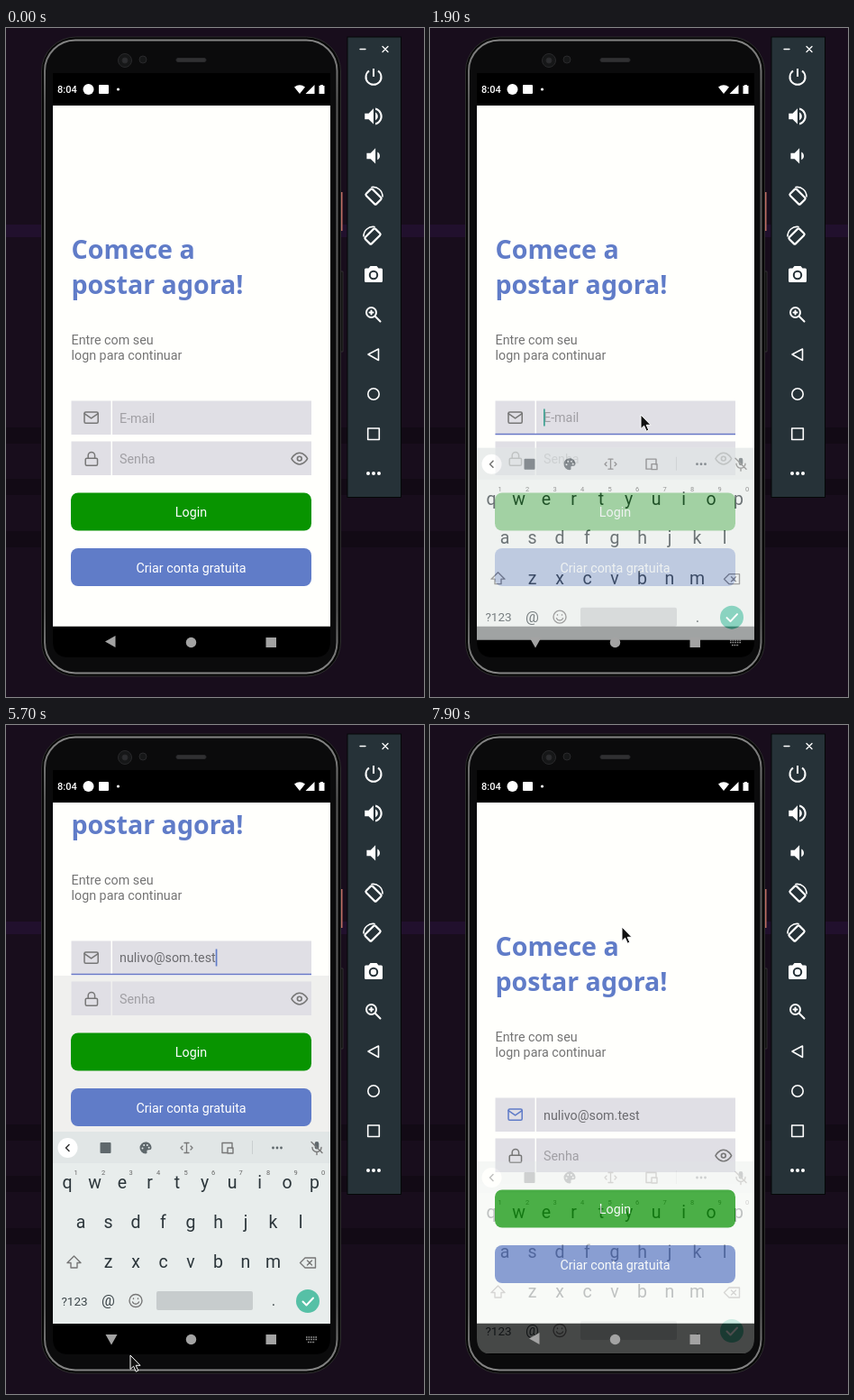
These frames come from a looping animation (464x742 px, 8000 ms). An HTML page:

```html
<!DOCTYPE html>
<html lang="pt">
<meta charset="utf-8">
<title>Login</title>
<style>
  html, body { margin: 0; width: 464px; height: 742px; overflow: hidden; background: #180d1c }
  svg { display: block; font: 14.3px Roboto, sans-serif }
  .line { fill: none; stroke: #777; stroke-width: 2; stroke-linecap: round; stroke-linejoin: round }
  .mid { text-anchor: middle }
  .key { font-size: 19.5px; fill: #2c363b }
  .digit { font-size: 7.5px; fill: #666 }
  .title { font: bold 28.6px "Noto Sans", sans-serif; fill: #607cc8 }
  .panel .line, .turn { stroke: #fff }
</style>
<svg width="464" height="742" viewBox="0 0 464 742">
  <defs>
    <linearGradient id="rim" x2="0" y2="1">
      <stop stop-color="#858585"/><stop offset=".1" stop-color="#5a5a5a"/>
      <stop offset=".9" stop-color="#5a5a5a"/><stop offset="1" stop-color="#858585"/>
    </linearGradient>
    <clipPath id="screen"><path d="M52 50H360V680Q360 698 342 698H70Q52 698 52 680Z"/></clipPath>
    <g id="turn" fill="none" stroke="#fff" stroke-linecap="round">
      <rect x="-5" y="-8" width="10" height="16" rx="1.5" transform="rotate(-45)" stroke-width="2.2"/>
      <path d="M-2-10.500A10.500 10.500 0 0 1 10 0" stroke-width="1.6"/>
    </g>
  </defs>

  <!-- desktop -->
  <path d="M0 218H464V232H0Z" fill="#21102d"/>
  <path d="M0 443H464V461H0ZM0 500H464V518H0ZM0 558H464V576H0Z" fill="#120a15"/>

  <!-- phone -->
  <path d="M371 182H373.500V225H371Z" fill="#bd6c62"/>
  <path d="M371 270H374V359H371Z" fill="#111" stroke="#444" stroke-width=".6"/>
  <rect x="39.500" y="10" width="332" height="709" rx="38" fill="#060606" stroke="#2c2c2c"/>
  <rect x="43" y="13.500" width="324.500" height="702" rx="34" fill="#0b0b0c" stroke="url(#rim)" stroke-width="2"/>
  <g fill="#161718" stroke="#29292b">
    <circle cx="132" cy="36" r="7.500"/><circle cx="132" cy="36" r="3" fill="#2c2d30"/><circle cx="152" cy="35" r="4"/>
    <rect x="189" y="33.500" width="33" height="4" rx="2" fill="#303032"/>
  </g>
  <path d="M52 86V70Q52 50 72 50H340Q360 50 360 70V680Q360 698 342 698H70Q52 698 52 680Z"/>

  <g clip-path="url(#screen)">
    <rect x="52" y="86" width="308" height="577.500" fill="#f0f0ee"/>
    <rect id="page" x="52" y="86" width="308" fill="#fffffc"/>
    <g id="form">
      <text x="72.500" y="256" class="title">Comece a</text>
      <text x="72.500" y="295" class="title">postar agora!</text>
      <g fill="#747474"><text x="72.500" y="351">Entre com seu</text><text x="72.500" y="367.500">logn para continuar</text></g>
      <path d="M72.500 413.500H116.500V451H72.500ZM118 413.500H339V451H118ZM72.500 458.500H116.500V496H72.500ZM118 458.500H339V496H118Z" fill="#e0dfe5"/>
      <path id="focus" d="M72.500 450.500H339" stroke="#6877c6" stroke-width="1.400"/>
      <g id="mail" class="line" transform="translate(85.500 423) scale(.76)">
        <rect x="2" y="4" width="20" height="16" rx="2"/><path d="M22 6L12 13 2 6"/>
      </g>
      <g class="line" transform="translate(86 469) scale(.74)">
        <rect x="3" y="11" width="18" height="11" rx="2"/><path d="M7 11V7a5 5 0 0 1 10 0v4"/>
      </g>
      <g class="line" transform="translate(316.200 468) scale(.8)">
        <path d="M1 12s4-8 11-8 11 8 11 8-4 8-11 8-11-8-11-8z"/><circle cx="12" cy="12" r="3"/>
      </g>
      <text id="value" x="126"></text>
      <path id="compose" stroke="#777"/>
      <rect id="caret" y="422.500" width="1.700" height="19"/>
      <text x="126" y="483" fill="#a09fa4">Senha</text>
      <rect x="72" y="515.500" width="267" height="42" rx="8" fill="#089400"/>
      <rect x="72" y="577" width="267" height="42" rx="8" fill="#607cc8"/>
      <g class="mid" fill="#fff"><text x="205.500" y="542">Login</text><text x="205.500" y="604">Criar conta gratuita</text></g>
    </g>
    <path d="M52 50H360V86H52Z"/>

    <g id="keyboard">
      <path d="M52 451H360V664H52Z" fill="#e8edec"/>
      <path d="M52 451H360V486H52Z" fill="#e1e6e6"/>
      <circle cx="68.500" cy="469" r="11" fill="#fff"/>
      <path id="chevron" class="line" style="stroke:#333;stroke-width:1.500"/>
      <g id="tools" fill="#5f686c">
        <rect x="104.500" y="463" width="12" height="12" rx="1"/>
        <path d="M155 462.500a6.500 6.500 0 1 0 0 13q2 0 1.500-2-.7-2.500 2-2.300 3 .2 3-2.500c0-3.500-3-6.200-6.500-6.200z"/>
        <g fill="#e1e6e6"><circle cx="151.500" cy="469.500" r="1"/><circle cx="153.200" cy="466" r="1"/><circle cx="156.800" cy="466" r="1"/><circle cx="158.700" cy="468.800" r="1"/></g>
        <path d="M198 463.500h5M200.500 463.500v11M198 474.500h5M196 467l-2 2 2 2M205 467l2 2-2 2" class="line" style="stroke-width:1.300"/>
        <path d="M246 474.500h-6v-11h11v6M246 469h6v6h-6z" class="line" style="stroke-width:1.400"/>
        <path d="M273.500 461V476" stroke="#c9cecf"/>
        <circle cx="296.500" cy="469" r="1.400"/><circle cx="301" cy="469" r="1.400"/><circle cx="305.500" cy="469" r="1.400"/>
      </g>
      <g id="hints" class="mid" fill="#596166">
        <path d="M160.500 460V477M250.500 460V477" stroke="#c9cecf"/>
        <text id="typed" x="119.500" y="474" font-size="13.500"></text>
        <g id="words" font-size="13.500"><text x="205" y="474">nuvem</text><text x="290" y="474">nunca</text></g>
        <g id="mails">
          <g font-size="12" font-weight="500"><text x="205" y="465">nulivo</text><text x="290" y="465">nulivo</text></g>
          <g font-size="9"><text x="205" y="478">@som.test</text><text x="290" y="478">@musa.test</text></g>
        </g>
      </g>
      <rect x="342.700" y="462" width="4.600" height="8.500" rx="2.300" fill="#5f686c"/>
      <path d="M340 468.500a5 5 0 0 0 10 0M345 474v2.500M339 462.500l12 12" class="line" style="stroke-width:1.400"/>
      <g id="keys" class="mid"></g>
      <g class="line" style="stroke-width:1.400">
        <path d="M75.500 589l-7.500 7.500h4v5.500h7v-5.500h4zM332 591h11.500v11h-11.500l-5.500-5.500zM334.500 594l5 5M339.500 594l-5 5"/>
        <circle cx="144" cy="638.500" r="7"/><path d="M140.500 640a3.800 3.800 0 0 0 7 0M141.500 636v.5M146.500 636v.5"/>
      </g>
      <rect x="167" y="628" width="107" height="21" rx="2" fill="#c7cccd"/>
      <g class="mid" fill="#3b4549"><text x="76" y="643.500" font-size="13.500">?123</text><text x="113.500" y="644" font-size="16.500">@</text><text x="297" y="644" font-size="17">.</text></g>
      <circle cx="335" cy="639" r="13" fill="#56c0a6"/>
      <path d="M329.500 639.500l4 4 7.500-8" class="line" style="stroke:#fff"/>
    </g>

    <g fill="#a3a3a3">
      <path id="back" d="M7 0L-4.500 6.500V-6.500Z"/>
      <circle cx="205.500" cy="681.500" r="5.700"/><path d="M288.500 676H300V687H288.500Z"/>
      <path id="switcher" d="M333 679H345M333 681.500H345M335 684.500H343" stroke="#999" stroke-width="1.600" stroke-dasharray="1.600 1"/>
    </g>
  </g>

  <!-- status bar -->
  <g fill="#fff">
    <text x="57" y="72" font-size="11" font-weight="500">8:04</text>
    <circle cx="91.500" cy="68" r="6"/><rect x="103" y="63" width="11" height="10" rx="1"/><circle cx="124.500" cy="68" r="1.600"/>
    <path d="M320 65.500Q326 61 332 65.500L326 73ZM342.500 63V73H332.500ZM347.500 64H349V63H352V64H353.500V73H347.500Z"/>
  </g>

  <!-- emulator controls -->
  <rect x="379" y="10" width="59.500" height="510.500" fill="#263238" stroke="#050808"/>
  <g class="panel" fill="#fff">
    <path d="M393 23.500h6M418 20.500l6 6M424 20.500l-6 6" class="line" style="stroke-width:1.300"/>
    <path d="M408 45v9M403 47.500a8.500 8.500 0 1 0 10 0" class="line" style="stroke-linecap:butt"/>
    <path transform="translate(395 85) scale(1.080)" d="M3 9v6h4l5 5V4L7 9H3zm13.500 3c0-1.770-1.020-3.290-2.500-4.030v8.050c1.480-.73 2.500-2.250 2.500-4.020zM14 3.230v2.060c2.890.86 5 3.540 5 6.710s-2.110 5.850-5 6.710v2.060c4.010-.91 7-4.490 7-8.770s-2.990-7.860-7-8.770z"/>
    <path transform="translate(395 129) scale(1.080)" d="M18.500 12c0-1.770-1.020-3.290-2.500-4.030v8.050c1.480-.73 2.500-2.250 2.500-4.020zM5 9v6h4l5 5V4L9 9H5z"/>
    <use href="#turn" transform="translate(408 187)"/>
    <use href="#turn" transform="translate(407 231) scale(-1 1)"/>
    <path d="M404.500 264h7l2 2.500h3q1.500 0 1.500 1.500v12.500q0 1.500-1.500 1.500h-17q-1.500 0-1.500-1.500v-12.500q0-1.500 1.500-1.500h3z"/>
    <circle cx="408" cy="274" r="4.200" fill="none" stroke="#263238" stroke-width="2"/>
    <g class="line"><circle cx="405.500" cy="315.500" r="5.500"/><path d="M410 320l5.500 5.500M403.500 315.500h4M405.500 313.500v4"/></g>
    <g class="line" style="stroke-width:1.600">
      <path d="M402 362L413.500 356V368.500Z"/><circle cx="408" cy="406" r="6.200"/><rect x="401.700" y="444" width="12.600" height="12.500"/>
    </g>
    <circle cx="402" cy="494" r="2"/><circle cx="408" cy="494" r="2"/><circle cx="414" cy="494" r="2"/>
  </g>

  <path id="cursor" d="M0 0V15.500L3.600 12.200 6.300 18.200 8.800 17 6.200 11.300H11Z" fill="#111" stroke="#fff" stroke-width="1"/>
</svg>
<script>
const LOOP = 8000, FRAME = 100;
const NAME = 'nulivo', MAIL = 'nulivo@som.test';
const STROKES = [2800, 2900, 3100, 3300, 3500, 3700];
const BLINK_STARTS = [1400, 1900, ...STROKES, 5400];

// Pointer visits: each is a list of [time, x, y], shown until `until`
const VISITS = [
  { until: 2900, path: [[500, 300, 572], [1300, 234, 429]] },
  { until: 5900, path: [[4600, 234, 428], [4800, 160, 176], [5000, 111, 310], [5200, 204, 469], [5500, 204, 469], [5700, 138, 699]] },
  { until: LOOP, path: [[6100, 188, 411], [6500, 210, 270], [7500, 210, 270], [7700, 212, 189], [7800, 212, 189], [7900, 213, 224]] },
];

const el = id => document.getElementById(id);
const set = (id, attrs) => { for (const k in attrs) el(id).setAttribute(k, attrs[k]); };
const show = (id, on) => { el(id).style.display = on ? '' : 'none'; };
const ramp = (t, start, length) => Math.min(1, Math.max(0, (t - start) / length));

function buildKeys() {
  const rows = [['qwertyuiop', 68, 514], ['asdfghjkl', 83, 557.5], ['zxcvbnm', 113.5, 602]];
  let out = '';
  for (const [letters, x0, y] of rows) {
    [...letters].forEach((c, i) => {
      const x = x0 + i * 30.5;
      out += `<text class="key" x="${x}" y="${y}">${c}</text>`;
      if (y === 514) out += `<text class="digit" x="${x + 9.5}" y="499">${(i + 1) % 10}</text>`;
    });
  }
  el('keys').innerHTML = out;
}

function pointAt(path, t) {
  const i = path.findIndex(p => p[0] > t);
  if (i < 0) return path[path.length - 1].slice(1);
  const [a, b] = [path[i - 1], path[i]], u = ramp(t, a[0], b[0] - a[0]);
  return [a[1] + (b[1] - a[1]) * u, a[2] + (b[2] - a[2]) * u];
}

function drawField(t) {
  const count = STROKES.filter(s => s <= t).length;
  const text = t >= 5500 ? MAIL : NAME.slice(0, count);
  const composing = count > 0 && t < 5500;
  const value = el('value');
  value.textContent = text || 'E-mail';
  set('value', { y: t >= 1300 && t < 7900 ? 437.3 : 438, fill: text ? '#6b6b6f' : '#a09fa4' });
  const end = 126 + (text ? value.getComputedTextLength() : 0);

  show('compose', composing);
  set('compose', { d: `M126 440H${end}` });
  const blink = BLINK_STARTS.filter(s => s <= t).pop();
  show('caret', t >= 1300 && t < 7700 && !(Math.floor((t - (blink ?? t)) / 500) % 2));
  set('caret', { x: end, fill: t < 2900 ? '#3fa293' : '#607cc8' });
  show('focus', t >= 1500 && t < 7700);
  el('mail').style.stroke = t >= 7700 ? '#607cc8' : '';

  const hinting = t >= 2900 && t < 5500;
  show('tools', !hinting);
  show('hints', hinting);
  show('words', t < 3300);
  show('mails', t >= 3300);
  el('typed').textContent = text;
  set('chevron', { d: hinting ? 'M67 465.500L70.500 469 67 472.500' : 'M70 465.500L66.500 469 70 472.500' });
}

function draw(t) {
  const raised = t >= 2000 && t < 7900;
  set('page', { height: raised ? 192 : 577.5 });
  set('form', { transform: `translate(0 ${raised ? -174 : 0})` });
  drawField(t);

  const leaving = ramp(t, 7746, 154);
  const away = (1 - ramp(t, 1800, 300)) ** 2 + leaving ** 2;
  show('keyboard', t >= 1900);
  set('keyboard', { transform: `translate(0 ${33 * away})`, opacity: 1 - 0.7 * away });

  const turn = ramp(t, 1700, 150) - leaving;
  set('back', { transform: `translate(117 680.5) rotate(${180 + 270 * turn})` });
  show('switcher', t >= 1600 && t < 7800);

  const visit = VISITS.find(v => t >= v.path[0][0] && t < v.until);
  show('cursor', visit);
  if (visit) set('cursor', { transform: `translate(${pointAt(visit.path, t)})` });
}

function tick() {
  draw(Math.floor(performance.now() % LOOP / FRAME) * FRAME);
  requestAnimationFrame(tick);
}

buildKeys();
tick();
</script>
</html>
```
